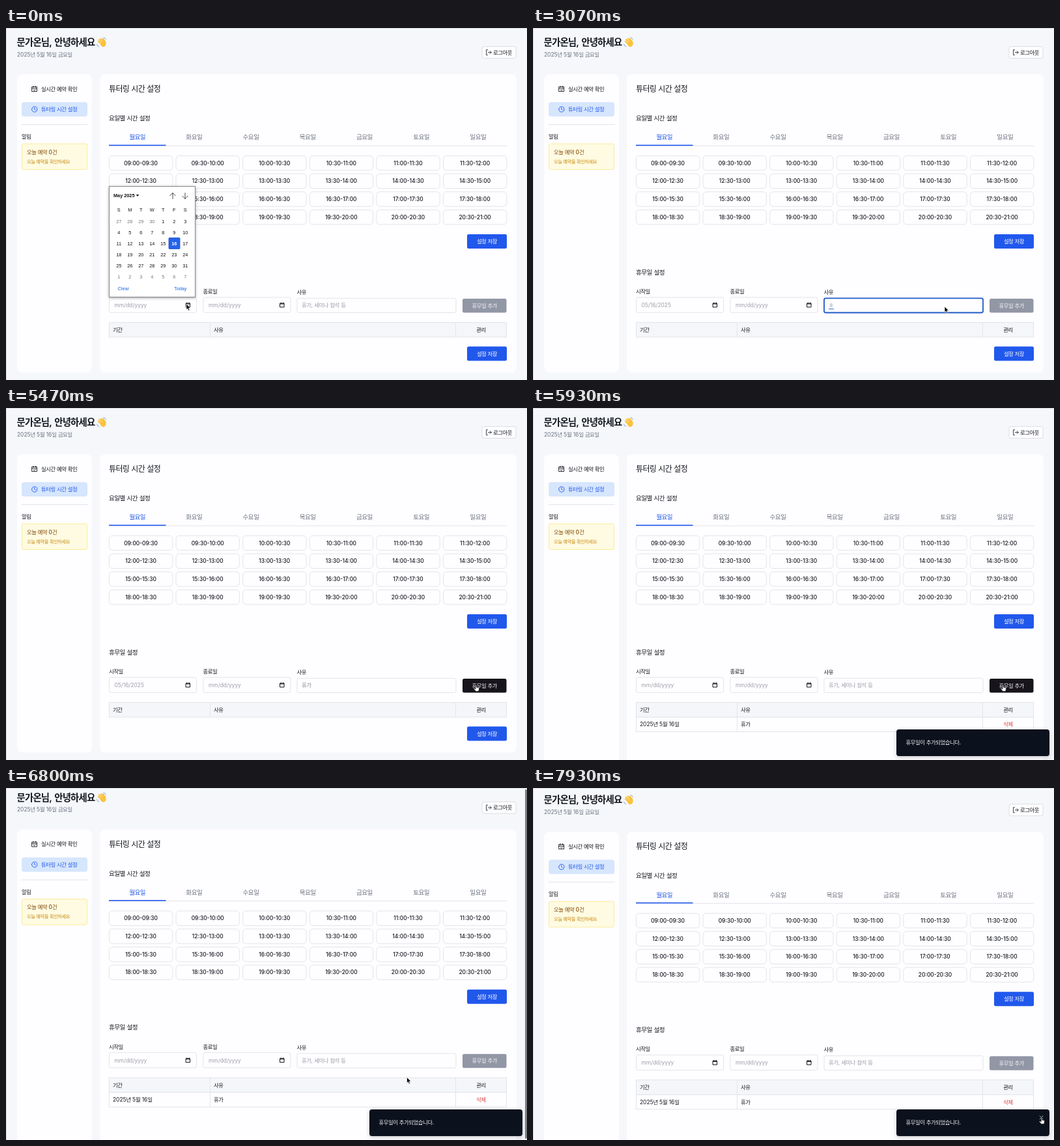
An HTML page that plays this animation: 800 px wide and 541 px high, repeating every 8 s.

```html
<!DOCTYPE html>
<html lang="ko">
<head>
<meta charset="utf-8">
<title>튜터링 시간 설정</title>
<style>
html, body { margin: 0; height: 100%; overflow: hidden; background: #f5f7fa; }
svg { display: block; width: 100%; height: 100%; }
text { font-family: Inter, 'Noto Sans CJK KR', 'Noto Sans CJK', sans-serif; white-space: pre; }
.ko { letter-spacing: -.055em; }
#picker text { font-family: 'Liberation Sans', Arial, sans-serif; }
.icon { fill: none; stroke-linecap: round; stroke-linejoin: round; }
</style>
</head>
<body>
<svg id="stage" viewBox="0 0 800 541"></svg>
<script>
const INK = '#14181f', GRAY = '#6b7280', HINT = '#9ca0aa', LINE = '#e3e5ea', BLUE = '#2158ec', CARD = '#fefdff';
const LOOP = 8000;

const text = (x, y, s, { size = 8.4, fill = INK, weight = 400, anchor = 'start', id = '' } = {}) =>
  `<text id="${id}" x="${x}" y="${y}" font-size="${size}" fill="${fill}" font-weight="${weight}" text-anchor="${anchor}">` +
  s.replace(/[가-힣]+/g, '<tspan class="ko">$&</tspan>') + '</text>';
const mid = (x, y, s, o) => text(x, y, s, { anchor: 'middle', ...o });
const box = (x, y, w, h, r, fill, stroke = 'none', extra = '') =>
  `<rect x="${x}" y="${y}" width="${w}" height="${h}" rx="${r}" fill="${fill}" stroke="${stroke}" ${extra}/>`;
const path = (d, stroke, width = .8, extra = '') =>
  `<path class="icon" d="${d}" stroke="${stroke}" stroke-width="${width}" ${extra}/>`;
const group = (id, body, extra = '') => `<g id="${id}" ${extra}>${body}</g>`;

function header() {
  const hand = path('M142 20.5L147 25.5M143.2 17.8L148.5 23M146 16.5L150.5 21.5M149.2 17L152 22', '#fbc23c', 2.3) +
    '<path d="M144.5 23L151 19.5Q152.6 18.2 153 20.5Q154.6 25.5 152 28Q149 30 146 27.5Z" fill="#fbc23c"/>' +
    path('M139.5 25Q140 27.7 142.6 28.5M149.8 14.6Q152.4 15 153.4 17.4', '#6d9bc4', .9);
  return text(16.5, 27, '문가온님, 안녕하세요', { size: 14.4, weight: 600 }) + hand +
    text(17, 43.5, '2025년 5월 16일 금요일', { fill: GRAY }) +
    box(731, 28.5, 52, 18, 3, CARD, '#dcdee3') +
    path('M739.5 33.5H737.5V41.5H739.5M740.5 37.5H745M743 35.3L745.2 37.5L743 39.7', INK) +
    text(748, 40.5, '로그아웃', { weight: 500 });
}

function sidebar() {
  return box(17, 71, 115, 458.5, 8, CARD, 'none', 'class="card"') +
    path('M40 90.5H47.5V97.5H40ZM40 93H47.5M42 89.3V91.3M45.5 89.3V91.3M42.3 95.2L43.4 96.2L45.3 94.4', INK, .9) +
    text(54, 96.8, '실시간 예약 확인', { weight: 500 }) +
    box(24, 114, 101, 22, 4, '#d6e6fd') +
    path('M39.6 125a4.1 4.1 0 1 0 8.2 0a4.1 4.1 0 1 0 -8.2 0M43.7 122.5V125L45.4 126', BLUE, .9) +
    text(54, 128, '튜터링 시간 설정', { weight: 500, fill: BLUE }) +
    path('M24 148.5H125', LINE, 1) +
    text(24, 170, '알림', { weight: 500 }) +
    box(24.5, 178, 100, 39.5, 2.5, '#fefbe2', '#fbeb9c') +
    text(32, 193.5, '오늘 예약 0건', { weight: 500, fill: '#854d0e' }) +
    text(32, 207.8, '오늘 예약을 확인하세요', { size: 7.2, weight: 500, fill: '#c98a12' });
}

const clock = m => [Math.floor(m / 60), m % 60].map(n => String(n).padStart(2, '0')).join(':');

function schedule() {
  let s = text(158, 98, '튜터링 시간 설정', { size: 12, weight: 500 }) +
    text(158, 142, '요일별 시간 설정', { size: 9.6, weight: 500 }) + path('M158 181H769', LINE, 1);
  [...'월화수목금토일'].forEach((d, i) => {
    s += mid(158 + 87.2 * (i + .5), 171.3, d + '요일', { size: 9.6, weight: i ? 400 : 500, fill: i ? GRAY : BLUE });
  });
  s += box(158, 179.5, 87.5, 1.6, 0, BLUE);
  for (let k = 0; k < 24; k++) {
    const x = 158.4 + 102.6 * (k % 6), y = 196.3 + 27.75 * Math.floor(k / 6), m = 540 + 30 * k;
    s += box(x, y, 97.4, 22.4, 5, CARD, LINE) +
      mid(x + 48.7, y + 14.2, `${clock(m)}-${clock(m + 30)}`, { weight: 500 });
  }
  return s + saveButton(317);
}

const saveButton = y => box(708, y, 61, 22, 2.5, BLUE) + mid(738.5, y + 14, '설정 저장', { fill: '#fff', weight: 500 });

const dateField = (x, label, id) => text(x, 408, label) +
  box(x + .5, 414, 134, 23.3, 2.5, CARD, LINE) +
  text(x + 8.5, 429, 'mm/dd/yyyy', { fill: HINT, id }) +
  path(`M${x + 118.5} 423.2h6v5.8h-6zM${x + 118.5} 424h6M${x + 119.8} 422v1M${x + 123.2} 422v1`, '#111', 1);

function daysOff() {
  const cells = (y, h, fill) => box(158.5, y, 610, h, 0, fill, LINE) + path(`M313.5 ${y}v${h}M690.5 ${y}v${h}`, LINE, 1);
  const bold = { weight: 500 };
  return text(158, 378.5, '휴무일 설정', { size: 9.6, weight: 500 }) +
    dateField(158, '시작일', 'start') + dateField(302.5, '종료일', 'end') +
    text(446.5, 409, '사유') + box(447, 415.3, 244, 22.2, 2.5, CARD, LINE) +
    box(447, 415.3, 244, 22.2, 2.5, 'none', '#1f5cc8', 'id="ring" stroke-width="1.8"') +
    text(454, 429, '휴가, 세미나 참석 등', { fill: HINT, id: 'hint' }) +
    '<text id="reason" class="ko" x="454" y="429" font-size="8.4" fill="#868b96"></text>' +
    path('M0 431.8h7', '#2563eb', 1, 'id="compose"') +
    box(701, 416, 67.5, 21.5, 2.5, '', 'none', 'id="add"') +
    mid(734.8, 429.8, '휴무일 추가', { fill: '#f3f4f7', weight: 500 }) +
    group('row', cells(475, 22.5, CARD) + text(164, 489.3, '2025년 5월 16일') + text(319, 489.3, '휴가') +
      mid(729.5, 489.3, '삭제', { fill: '#d9443f' })) +
    cells(452.5, 22.5, '#f4f6f9') +
    text(164, 467, '기간', bold) + text(319, 467, '사유', bold) + mid(729.5, 467, '관리', bold) +
    group('save', saveButton(489.5));
}

function picker() {
  const size = 7.3, dark = '#111';
  let s = box(158.5, 243.5, 132, 170, 0, '#fff', '#8a8a8a', 'style="filter:drop-shadow(0 1px 2px #0005)"') +
    text(165, 260, 'May 2025', { size, weight: 700, fill: dark }) +
    `<path d="M199.8 256h4.4l-2.2 3z" fill="${dark}"/>` +
    path('M256 262.5V253.5M251.8 257.8L256 253.5L260.2 257.8M275 253.5V262.5M270.8 258.3L275 262.5L279.2 258.3', '#333', .9) +
    box(250, 322.5, 17, 17, 1, '#2463eb', '#1b50c8', 'stroke-width=".8"');
  [...'SMTWTFS'].forEach((d, i) => { s += mid(173.3 + 17 * i, 282.3, d, { size, fill: dark }); });
  for (let k = 0; k < 42; k++) {
    const date = new Date(2025, 3, 27 + k), day = date.getDate(), may = date.getMonth() === 4, today = may && day === 16;
    s += mid(173.3 + 17 * (k % 7), 299.8 + 17 * Math.floor(k / 7), String(day),
      { size, fill: today ? '#fff' : may ? dark : '#777', weight: today ? 700 : 400 });
  }
  return s + text(171.5, 403, 'Clear', { size, fill: '#1a66e0' }) +
    text(277.5, 403, 'Today', { size, fill: '#1a66e0', anchor: 'end' });
}

const toast = box(558, 494, 235, 41, 4, '#0b111d', 'none', 'style="filter:drop-shadow(0 2px 3px #0003)"') +
  text(572.5, 517.4, '휴무일이 추가되었습니다.', { fill: '#f1f4f8', weight: 500 }) +
  path('M778.2 504L783 508.8M783 504L778.2 508.8', '#d5d9e0', .9, 'id="close"');

const arrow = '<path d="M0 0V9L2 7.2L3.4 10.4L5 9.7L3.6 6.6H6.3Z" fill="#000" stroke="#fff" stroke-width=".7"/>';
const finger = '<path d="M-.9 -4.4Q0 -5.4 .8 -4.4V-.8L3.6 -.2Q4.6 .2 4.5 1.4L3.8 5.4H-.6L-3.6 1.8Q-3.9 .6 -2.6 .7L-.9 2Z" ' +
  'fill="#fff" stroke="#111" stroke-width=".8" stroke-linejoin="round"/>';

document.getElementById('stage').innerHTML =
  box(0, 0, 800, 541, 0, '#f5f7fa') +
  group('page', header() + sidebar() + box(144, 71, 640, 458.5, 8, CARD, 'none', 'class="card"') +
    schedule() + daysOff() + group('picker', picker())) +
  box(797, 2, 3, 537, 1.5, '#7d7f84', 'none', 'id="bar"') +
  path('M0 .5H800M.5 0V541', '#dadde3', 1) +
  group('toast', toast) + group('cursor', group('arrow', arrow) + group('finger', finger));

const el = {};
document.querySelectorAll('[id]').forEach(n => { el[n.id] = n; });
const cards = document.querySelectorAll('.card');

const clamp = v => Math.max(0, Math.min(1, v));
const ramp = (t, a, b) => { const p = clamp((t - a) / (b - a)); return p * p * (3 - 2 * p); };
const show = (n, on) => n.setAttribute('opacity', Number(on));

// Keys are [time, ...values]; values ease from one key to the next.
function track(t, keys) {
  const i = keys.findIndex(k => k[0] > t);
  if (i < 0) return keys[keys.length - 1].slice(1);
  if (!i) return keys[0].slice(1);
  const a = keys[i - 1], b = keys[i], p = ramp(t, a[0], b[0]);
  return a.slice(1).map((v, j) => v + (b[j + 1] - v) * p);
}

const pointer = [[70, 277, 424], [600, 258, 331], [1870, 258, 331], [2330, 632, 428], [4670, 632, 428],
  [5400, 722, 430], [6250, 722, 430], [6470, 615.5, 444.5], [6800, 615.5, 444.5], [7200, 646, 449], [7900, 781, 511]];
const scroll = [[6630, 0], [6800, 7.3], [6900, 7.3], [7200, 5.2], [7500, 3.8], [7930, 3.7]];
const typing = [[3000, 'ㅎ'], [3270, '휴'], [3530, '휵'], [3870, '휴가'], [5500, '']];

function draw(t) {
  const [x, y] = track(t, pointer), [dy] = track(t, scroll);
  const added = t >= 5530, onClose = x > 772 && y > 500, onAdd = x > 701 && x < 768 && y < 438;
  const word = typing.reduce((w, [at, s]) => t >= at ? s : w, '');

  el.page.setAttribute('transform', `translate(0 ${-dy})`);
  cards.forEach(c => c.setAttribute('height', added ? 481 : 458.5));
  el.save.setAttribute('transform', `translate(0 ${added ? 22.5 : 0})`);
  show(el.row, added);
  show(el.picker, t < 1470);
  el.start.textContent = t >= 1470 && !added ? '05/16/2025' : 'mm/dd/yyyy';

  show(el.ring, t >= 2530 && t < 5470);
  show(el.hint, !word);
  el.reason.textContent = word;
  show(el.compose, word && t < 5470 ? 1 : 0);
  el.compose.setAttribute('transform', `translate(${454.4 + 7.3 * (word.length - 1)} 0)`);

  const hover = ramp(t, 5180, 5320) - ramp(t, 6300, 6440);
  const mix = (a, b) => Math.round(a + (b - a) * hover);
  el.add.setAttribute('fill', `rgb(${mix(146, 23)},${mix(151, 21)},${mix(166, 27)})`);

  show(el.toast, added);
  el.toast.setAttribute('transform', `translate(0 ${47 * (1 - ramp(t, 5500, 5730))})`);
  show(el.close, ramp(t, 7580, 7730));
  show(el.bar, ramp(t, 6630, 6690) - ramp(t, 7380, 7470));

  el.cursor.setAttribute('transform', `translate(${x} ${y})`);
  show(el.finger, onAdd || onClose);
  show(el.arrow, !(onAdd || onClose));
}

const begin = performance.now();
(function frame() {
  draw((performance.now() - begin) % LOOP);
  requestAnimationFrame(frame);
})();
</script>
</body>
</html>
```
